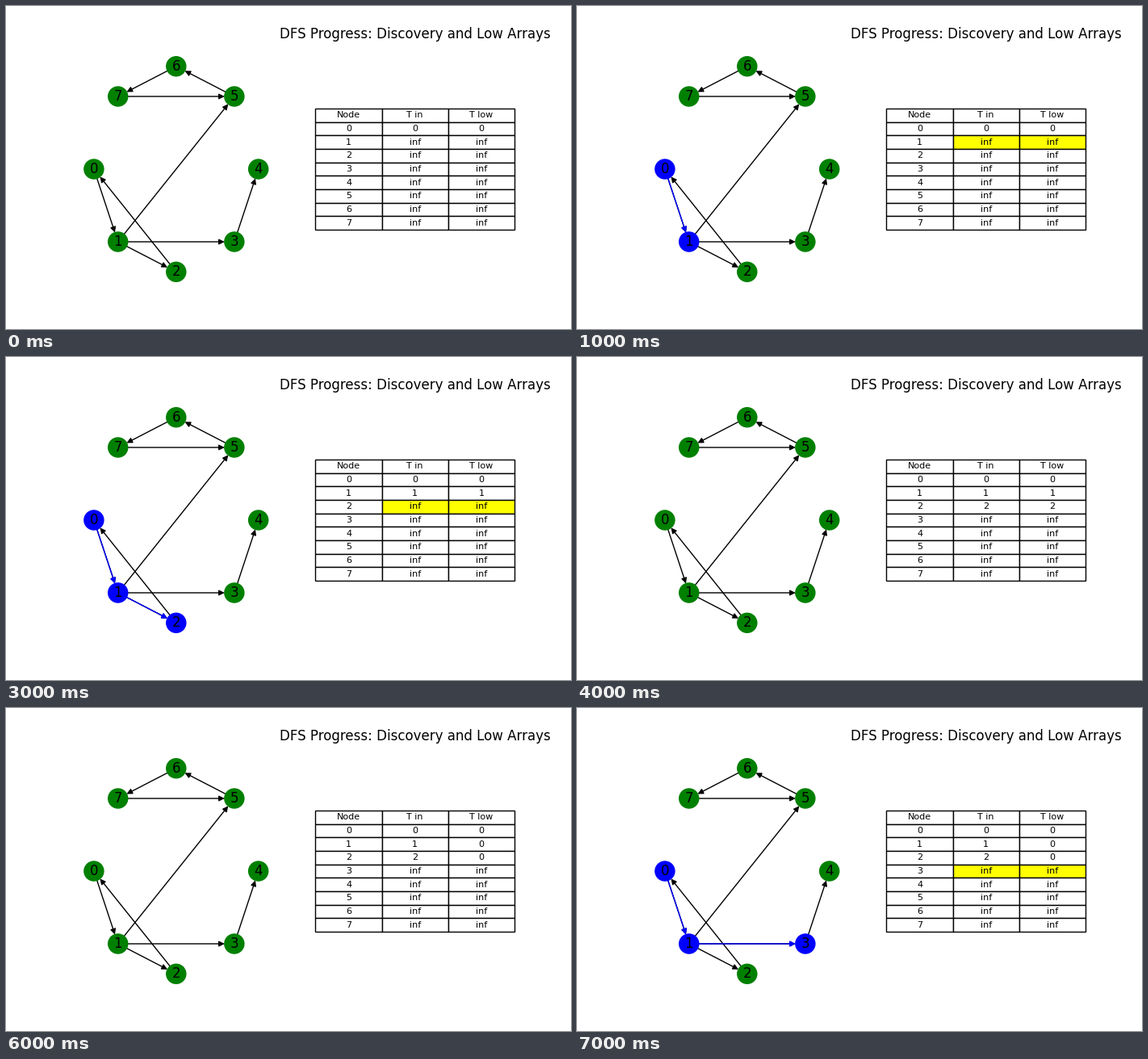
A matplotlib script for the animation above (8000 ms loop, 700x400 px).

```python
import math
from itertools import islice, pairwise

import matplotlib.pyplot as plt
from matplotlib.animation import FuncAnimation
from matplotlib.patches import FancyArrowPatch

CHAINS = ["0120", "134", "15675"]
EDGES = [(int(a), int(b)) for chain in CHAINS for a, b in pairwise(chain)]
NODES = 1 + max(max(edge) for edge in EDGES)
NODE_SIZE = 300
LIMIT = 1.1 * 1.1
STEP_COUNT = 8


def position(node):
    angle = math.pi + node * math.tau / NODES
    return math.cos(angle), math.sin(angle)


def search(path, t_in, t_low):
    """Depth-first search yielding (T in, T low, highlighted path)."""
    node = path[-1]
    t_in[node] = t_low[node] = len(t_in)
    yield dict(t_in), dict(t_low), []
    for start, end in EDGES:
        if start != node:
            continue
        branch = path + [end]
        yield dict(t_in), dict(t_low), branch
        if end in t_in:
            t_low[node] = min(t_low[node], t_in[end])
        else:
            yield from search(branch, t_in, t_low)
            t_low[node] = min(t_low[node], t_low[end])
            yield dict(t_in), dict(t_low), []


def draw_edges(ax, edges, color):
    shrink = math.sqrt(NODE_SIZE) / 2
    for start, end in edges:
        ax.add_patch(FancyArrowPatch(
            position(start), position(end), arrowstyle="-|>",
            mutation_scale=10, shrinkA=shrink, shrinkB=shrink,
            color=color, linewidth=1, zorder=1))


def draw_graph(ax, path):
    ax.clear()
    ax.set_axis_off()
    ax.set_xlim(-LIMIT, LIMIT)
    ax.set_ylim(-LIMIT, LIMIT)
    draw_edges(ax, EDGES, "black")
    draw_edges(ax, pairwise(path), "blue")
    xs, ys = zip(*map(position, range(NODES)))
    colors = ["blue" if node in path else "green" for node in range(NODES)]
    ax.scatter(xs, ys, s=NODE_SIZE, c=colors, zorder=2)
    for node in range(NODES):
        ax.text(*position(node), str(node), size=12, ha="center", va="center")


def draw_table(ax, t_in, t_low, path):
    ax.clear()
    ax.set_axis_off()
    ax.set_title("DFS Progress: Discovery and Low Arrays", fontsize=12)
    rows = [[node, t_in.get(node, "inf"), t_low.get(node, "inf")]
            for node in range(NODES)]
    table = ax.table(cellText=rows, colLabels=["Node", "T in", "T low"],
                     cellLoc="center", loc="center")
    table.auto_set_font_size(False)
    table.set_fontsize(8)
    if path:
        for col in (1, 2):
            table[path[-1] + 1, col].set_facecolor("yellow")


def update(step):
    t_in, t_low, path = steps[step]
    draw_graph(graph_ax, path)
    draw_table(table_ax, t_in, t_low, path)


steps = list(islice(search([0], {}, {}), STEP_COUNT))

plt.rcParams["font.family"] = "DejaVu Sans"
fig, (graph_ax, table_ax) = plt.subplots(1, 2, figsize=(7, 4), dpi=100)
anim = FuncAnimation(fig, update, frames=STEP_COUNT, interval=1000,
                     init_func=lambda: None, repeat=True, repeat_delay=0)
plt.show()
```
